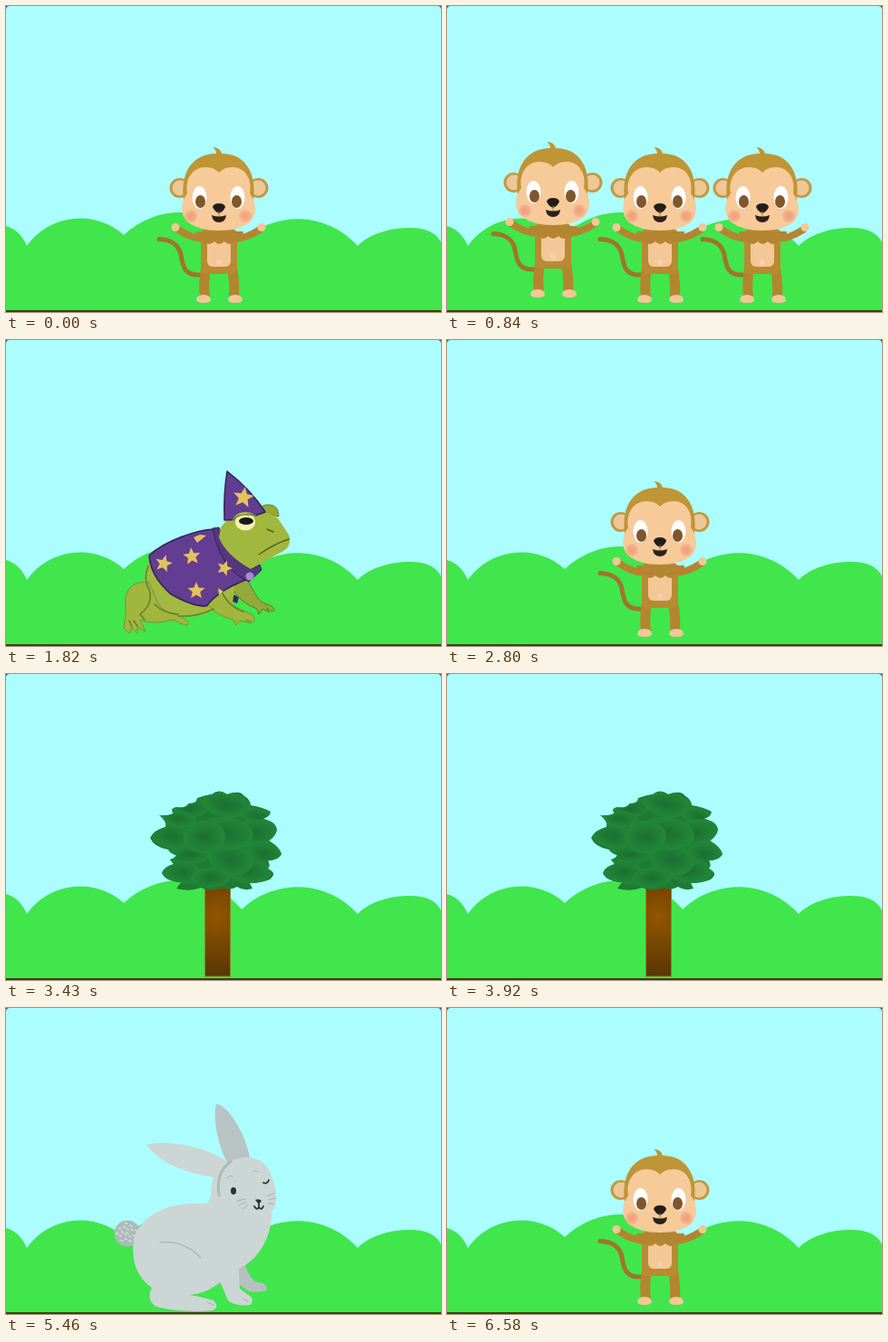
Write an HTML page that moves like this. It is 480 px wide and 338 px high and loops after 6720 ms.

```html
<!DOCTYPE html>
<html lang="en">
<head>
<meta charset="utf-8">
<title>Meadow</title>
<style>
html, body { margin: 0; height: 100%; overflow: hidden; background: #acfdff; }
svg { display: block; width: 480px; height: 338px; }
.line { fill: none; stroke-linecap: round; stroke-linejoin: round; }
</style>
</head>
<body>
<svg viewBox="0 0 480 338">
  <defs>
    <radialGradient id="blush"><stop offset=".3" stop-color="#f1a27c"/><stop offset="1" stop-color="#f5b991"/></radialGradient>
    <radialGradient id="bark" gradientUnits="userSpaceOnUse" cx="233" cy="268" r="66">
      <stop offset="0" stop-color="#935500"/><stop offset="1" stop-color="#593605"/>
    </radialGradient>
    <radialGradient id="leaf">
      <stop offset="0" stop-color="#1a7030"/><stop offset="1" stop-color="#22873a"/>
    </radialGradient>
    <path id="star" d="M0-10 2.6-3.5 9.5-3.1 4.2 1.3 5.9 8.1 0 4.4-5.9 8.1-4.2 1.3-9.5-3.1-2.6-3.5Z" fill="#e2c25c"/>
    <path id="crown" d="M169 156Q179 157 185 154Q180 148 189 147Q197 149 202 143Q211 143 211 137Q219 134 227 133Q235 126 244 133Q258 128 262 134Q270 139 270 145Q283 147 292 152Q291 158 283 160Q298 163 299 172Q297 180 290 184Q302 191 304 199Q300 206 289 206Q292 211 289 215Q300 220 291 227Q281 231 269 231L272 237Q262 240 255 235Q246 240 238 236Q226 241 215 236Q203 241 188 237L193 230Q176 229 172 220Q174 213 185 210L181 205Q186 204 188 200Q181 198 179 194Q163 191 159 181Q164 172 176 169Q178 163 169 156Z"/>
    <clipPath id="crownClip"><use href="#crown"/></clipPath>

    <g id="monkeyShape">
      <path class="line" d="M169 257.500C182 258 191 264 193 275S196 298 214 297" stroke="#9f752b" stroke-width="5"/>
      <path class="line" d="M220 257Q207 258 190 247M250 257Q263 258 280 247" stroke="#b38530" stroke-width="8"/>
      <circle cx="187" cy="244.500" r="4.500" fill="#f3c796"/><circle cx="282" cy="244.500" r="4.500" fill="#f3c796"/>
      <path d="M215 290H226Q223 306 225 322H214Q212 306 215 290ZM244 290H255Q258 306 257 322H246Q247 306 244 290Z" fill="#b38530"/>
      <path d="M210 325Q210 319 218 319T226 325Q225 328 218 328T210 325ZM245 325Q245 319 253 319T261 325Q260 328 253 328T245 325Z" fill="#f3c796"/>
      <rect x="215" y="246" width="40" height="50" rx="6" fill="#b88a32"/>
      <rect x="222" y="257" width="26" height="31" rx="6" fill="#f3c796"/>
      <circle cx="235" cy="283" r="3" fill="#f6d2ac"/>
      <path d="M209 249H262Q262 259 253 260Q246 266 241 260Q235 266 230 260Q224 266 218 260Q210 259 209 249Z" fill="#b38530"/>
      <g fill="#bf9a45"><circle cx="191.500" cy="201" r="11"/><circle cx="278.500" cy="201" r="11"/></g>
      <g fill="#eec797"><circle cx="192" cy="201" r="8.500"/><circle cx="278" cy="201" r="8.500"/></g>
      <path d="M196 214C192 182 207 163 232 163Q232 159 228 156Q236 156 238 163C263 163 277 183 273 214Z" fill="#bf9536"/>
      <path d="M200 207C197 190 207 178 220 178Q230 178 235 184Q240 178 250 178C263 178 272 190 269 207C277 217 277 231 269 239Q257 248 235 248T201 239C192 231 192 217 200 207Z" fill="#f7ca9a"/>
      <g fill="url(#blush)"><circle cx="204" cy="232" r="7"/><circle cx="264" cy="232" r="7"/></g>
      <g fill="#fff"><ellipse cx="213.500" cy="211.500" rx="8" ry="12.500"/><ellipse cx="255.500" cy="211.500" rx="8" ry="12.500"/></g>
      <g fill="#80572c"><ellipse cx="214.500" cy="216" rx="5.500" ry="7"/><ellipse cx="254.500" cy="216" rx="5.500" ry="7"/></g>
      <path d="M228 222Q229 218 235 218T242 222Q240 227 235 229Q230 227 228 222Z" fill="#221d19"/>
      <path class="line" d="M235 227V232" stroke="#b98328"/>
      <path d="M227 231Q235 234 243 231Q242 239 235 239T227 231Z" fill="#2b211b"/>
    </g>
  </defs>

  <rect width="480" height="338" fill="#acfdff"/>
  <path d="M0 243Q15 247 23 265A72 72 0 0 1 130 253A89 89 0 0 1 260 260A89 89 0 0 1 388 265C403 250 427 245 446 245Q472 245 480 261V338H0Z" fill="#40e64b"/>
  <path d="M0 337H480" stroke="#3a4010" stroke-width="2"/>
  <path d="M0 0H4Q0 0 0 4ZM480 0H476Q480 0 480 4Z" fill="#3b5052"/>

  <use id="left" href="#monkeyShape" x="-118" y="-6"/>
  <use id="monkey" href="#monkeyShape"/>
  <use id="right" href="#monkeyShape" x="113"/>

  <g id="frog" stroke-linejoin="round">
    <path d="M248 280L257 284 255 291 246 287Z" fill="#38265c"/>
    <path d="M266 262Q274 283 283 290L293 294Q298 298 294 300L287 296 291 301 283 297 279 303 277 297Q259 291 249 274Z" fill="#94a93c" stroke="#627929"/>
    <path d="M157 246C150 258 153 281 163 292Q185 309 218 303L250 291 255 252Z" fill="#a3b841"/>
    <path d="M158 268C139 265 130 278 132 292Q133 303 130 318L136 324 139 318 145 324 145 317 154 322 148 309Q160 315 184 309L198 315Q204 315 200 310L188 303Q172 300 168 291Z" fill="#a0b63d" stroke="#7c9134"/>
    <path class="line" d="M157 250Q151 263 158 276Q163 291 148 303L153 309M164 292Q174 302 190 303M139 317L136 310M145 316L141 310" stroke="#667c2b" stroke-width="1.500"/>
    <path d="M215 292L237 275Q243 292 262 299L272 304Q276 308 273 311L264 309 271 313 258 310 254 315 251 309Q234 305 223 293Z" fill="#a0b63d" stroke="#7c9134"/>
    <path class="line" d="M190 305Q212 306 229 297M238 277Q244 294 262 300" stroke="#6d812b" stroke-width="1.500"/>
    <path d="M229 209C211 210 176 221 158 238Q159 260 181 280Q204 294 221 294Q235 276 267 264Q237 251 229 209Z" fill="#623d92" stroke="#32234f" stroke-width="1.500"/>
    <path d="M228 208L235 207Q242 230 271 253L280 248 282 254 268 267Q237 254 228 208Z" fill="#553681" stroke="#32234f"/>
    <use href="#star" transform="translate(174 247)rotate(14)"/>
    <use href="#star" transform="translate(205 239)rotate(-6)"/>
    <use href="#star" transform="translate(210 277)"/>
    <use href="#star" transform="translate(241 252)rotate(20)scale(.9)"/>
    <path d="M207 218L214 215 221 216 216 220 211 224ZM234 274L240 278 235 282Z" fill="#e2c25c"/>
    <path d="M280 190Q280 181 291 182Q301 183 301 195Z" fill="#94aa37" stroke="#677d2a"/>
    <path d="M237 207Q250 189 272 190Q290 188 300 197L312 215Q316 227 306 233Q289 242 270 253Q242 237 235 218Z" fill="#a1b73e"/>
    <path class="line" d="M312 220Q296 225 279 237M288 209L295 212" stroke="#526421" stroke-width="1.500"/>
    <path d="M244 145Q271 166 286 190Q265 199 241 199Q240 169 244 145Z" fill="#623d92" stroke="#32234f" stroke-width="1.500"/>
    <use href="#star" transform="translate(262 174)rotate(9)scale(1.200)"/>
    <ellipse cx="264" cy="201" rx="14" ry="11" fill="#a1b73e"/>
    <ellipse cx="264" cy="201" rx="11" ry="9.500" fill="#f4f0b4"/>
    <ellipse cx="265" cy="200" rx="8" ry="4" fill="#171713"/>
    <path class="line" d="M251 199Q257 190 276 194" stroke="#677d2a" stroke-width="1.500"/>
    <circle cx="269" cy="261" r="4.500" fill="#a68bd0"/>
  </g>

  <g id="tree">
    <rect x="219.500" y="230" width="28" height="104" fill="url(#bark)" stroke="#8b8427"/>
    <use href="#crown" fill="#1f7b33"/>
    <g id="leaves" fill="url(#leaf)" clip-path="url(#crownClip)"></g>
  </g>

  <g id="rabbit">
    <path d="M244 171C233 150 228 119 232 106C245 107 265 140 269 166Z" fill="#b8c4c3"/>
    <path d="M238 188C202 184 169 172 155 151C174 145 221 152 244 170Z" fill="#cbd6d5"/>
    <circle cx="134" cy="249" r="14.500" fill="#aebab8"/>
    <g class="line" id="fluff" stroke="#d5dfdc" stroke-width="1.500"></g>
    <path d="M260 273Q268 300 277 303Q288 303 288 311Q283 315 268 313L248 299 218 313Z" fill="#b5c1bf"/>
    <path d="M235 180C219 193 233 214 218 216C180 214 151 228 142 252C136 279 145 298 161 309Q154 323 166 330Q196 337 228 334Q236 330 229 323Q212 318 202 317Q224 315 236 302L245 323Q253 330 269 328Q275 323 269 318L258 310 257 288C279 278 294 252 293 225Z" fill="#cbd6d5"/>
    <path class="line" d="M170 259Q195 256 215 276" stroke="#adbab8" stroke-width="1.500"/>
    <path d="M234 193Q237 167 264 165Q285 165 292 183Q301 202 297 220Q290 229 275 227Q234 222 234 193Z" fill="#cbd6d5"/>
    <path class="line" d="M235 207Q231 181 248 170" stroke="#aebbb9" stroke-width="3"/>
    <ellipse cx="251" cy="202" rx="3" ry="4" fill="#263536"/>
    <path class="line" d="M284 193Q288 195 290 190M279 217V220M274 219Q277 224 279 220Q282 224 284 219" stroke="#263536" stroke-width="1.800"/>
    <path d="M275 212Q279 210 282 213L279 217Z" fill="#263536"/>
    <path class="line" d="M244 188Q246 184 250 186M273 181Q275 178 278 181M255 213L264 211M257 218L265 214M261 222L267 217M289 208L295 205M290 212L297 210M290 216L296 216M222 325L229 328M262 321L267 324M280 307L284 310" stroke="#a3b0ae"/>
  </g>
</svg>
<script>
const LOOP = 6720;
const $ = id => document.getElementById(id);

// Overlapping lobes: centre, radii, tilt
$('leaves').innerHTML = [
  [203, 149, 23, 10, -12], [243, 144, 27, 14, 10], [278, 158, 20, 10, 18],
  [183, 179, 24, 14, 15], [191, 160, 19, 9, 5], [274, 176, 25, 15, -10],
  [285, 199, 20, 14, 15], [203, 199, 26, 11, -5], [267, 217, 25, 14, 8],
  [195, 219, 22, 13, 10], [226, 225, 22, 11, -5], [248, 205, 25, 17, 12],
  [243, 176, 30, 18, 8], [219, 180, 23, 18, -5]
].map(([x, y, rx, ry, tilt]) =>
  `<ellipse rx="${rx}" ry="${ry}" transform="translate(${x} ${y})rotate(${tilt})"/>`).join('');

let fluff = '';
for (let i = 0; i < 18; i++) {
  const radius = 2.8 * Math.sqrt(i), angle = i * 2.4;
  fluff += `<path d="M${133 + radius * Math.cos(angle)} ${248 + radius * Math.sin(angle)}l2 1"/>`;
}
$('fluff').innerHTML = fluff;

// Visible spans in milliseconds
const spans = {
  monkey: [[0, 1190], [2730, 3220], [5880, LOOP]],
  right: [[210, 1190]],
  left: [[420, 1190]],
  rabbit: [[1190, 1750], [4340, 5530]],
  frog: [[1750, 2450]],
  tree: [[3220, 4340]]
};

function draw(now) {
  const t = now % LOOP;
  for (const id in spans) {
    const visible = spans[id].some(([from, to]) => t >= from && t < to);
    $(id).style.display = visible ? '' : 'none';
  }
}

const start = performance.now();
function tick() {
  draw(performance.now() - start);
  requestAnimationFrame(tick);
}
tick();
</script>
</body>
</html>
```
